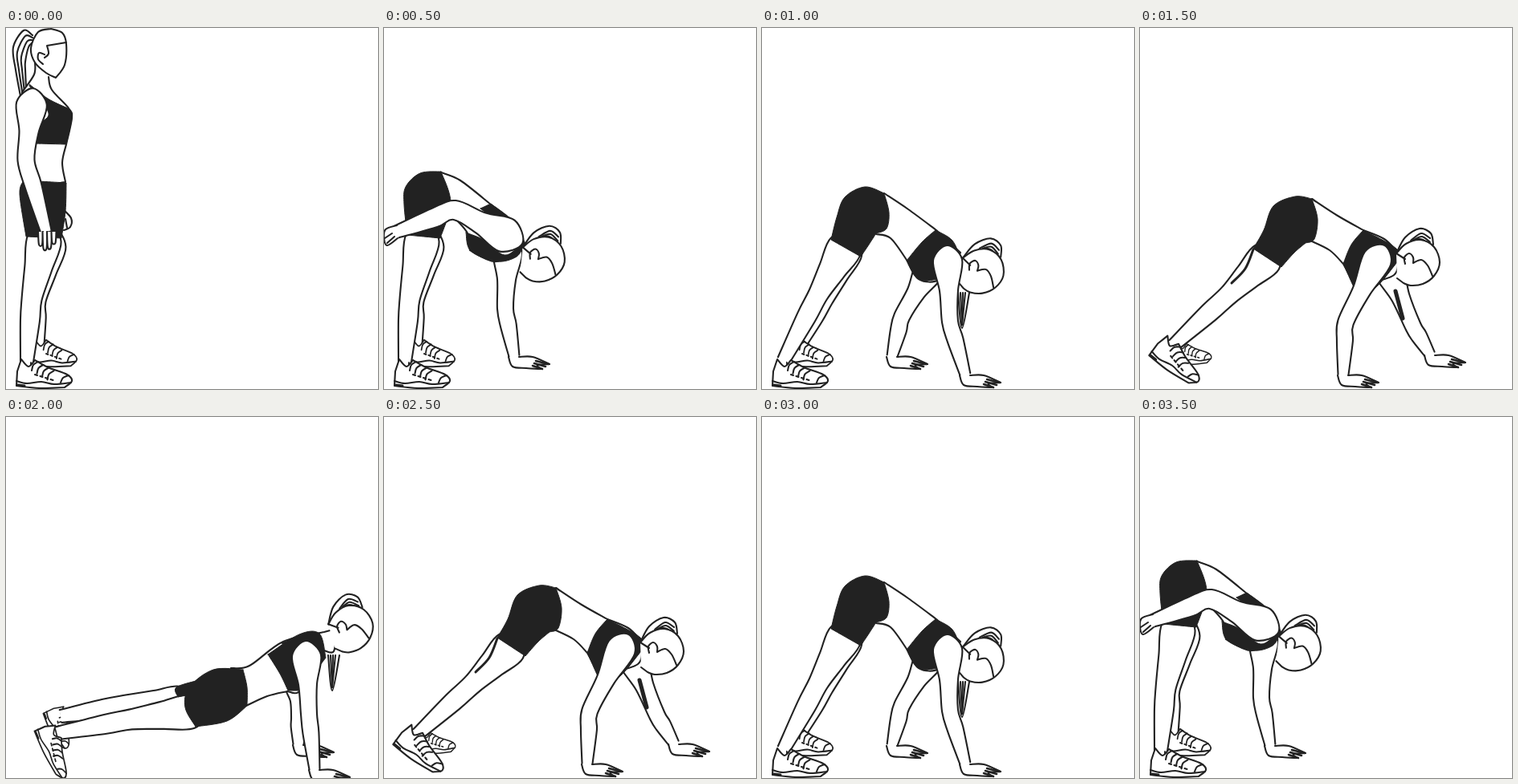
Recreate the animation shown at these times as an HTML page with a canvas. Size 463x450 px, loop 4 s.

```html
<!DOCTYPE html>
<html lang="en">
<head>
<meta charset="utf-8">
<title>Walkout exercise</title>
<style>
  html, body { margin: 0; width: 100%; height: 100%; overflow: hidden; background: #fff; }
  canvas { display: block; }
</style>
</head>
<body>
<canvas id="stage" width="463" height="450"></canvas>
<script>
const ctx = document.getElementById("stage").getContext("2d");
const INK = "#222", PAPER = "#fff", STEP = 500;

// Smooth curve through points, added to a path.
function spline(path, pts) {
  for (let i = 0; i < pts.length - 1; i++) {
    const b = pts[i], c = pts[i + 1], a = pts[i - 1] || b, d = pts[i + 2] || c;
    path.bezierCurveTo(b[0] + (c[0] - a[0]) / 6, b[1] + (c[1] - a[1]) / 6,
      c[0] - (d[0] - b[0]) / 6, c[1] - (d[1] - b[1]) / 6, ...c);
  }
}

// "x,y x,y | x,y": smooth runs, with a corner at the point before each "|".
function trace(text) {
  const path = new Path2D();
  let last;
  for (const run of text.split("|")) {
    const pts = run.trim().split(/\s+/).map(p => p.split(",").map(Number));
    if (last) pts.unshift(last);
    else path.moveTo(...pts[0]);
    spline(path, pts);
    last = pts.at(-1);
  }
  return path;
}

function paint(path, fill, width = 2.1) {
  ctx.fillStyle = fill || "transparent";
  ctx.fill(path);
  ctx.lineWidth = width;
  ctx.stroke(path);
}
const skin = text => paint(trace(text), PAPER);
const cloth = text => paint(trace(text), INK, 1);
const line = (text, width) => paint(trace(text), null, width);

const mix = (a, b, t) => a.map((v, i) => v + (b[i] - v) * t);

function placed(x, y, angle, sx, sy, body) {
  ctx.save();
  ctx.translate(x, y);
  ctx.rotate(angle * Math.PI / 180);
  ctx.scale(sx, sy);
  body();
  ctx.restore();
}

// Tapered limb along joints with the given radii: round at the start, open at the end.
function limb(joints, radii) {
  const left = [], right = [];
  let cap;
  joints.forEach(([x, y], i) => {
    const a = joints[i - 1] || joints[i], b = joints[i + 1] || joints[i], r = radii[i];
    const len = Math.hypot(b[0] - a[0], b[1] - a[1]);
    const dx = (b[0] - a[0]) / len * r, dy = (b[1] - a[1]) / len * r;
    left.unshift([x + dy, y - dx]);
    right.push([x - dy, y + dx]);
    cap ||= [x - dx, y - dy];
  });
  const pts = [...left, cap, ...right], path = new Path2D();
  path.moveTo(...pts[0]);
  spline(path, pts);
  paint(path, PAPER);
}

const leg = (hip, knee, ankle) =>
  limb([hip, mix(hip, knee, .5), knee, mix(knee, ankle, .35), ankle], [21, 17, 12.5, 12, 8]);

const arm = (shoulder, elbow, wrist, size = 1) =>
  limb([shoulder, mix(shoulder, elbow, .5), elbow, mix(elbow, wrist, .35), wrist],
    [18, 11.5, 10, 10, 6.5].map(r => r * size));

function propArm(shoulder, elbow, wrist) {
  arm(shoulder, elbow, wrist);
  placed(wrist[0] - 7, wrist[1] + 1, 0, 1, 1, () => {
    skin("13,0 30,0 51,9 | 36,10 40,15 | 22,14 5,12 0,0");
    for (let i = 0; i < 3; i++) line(`${34 - 2 * i},${5 + 3 * i} ${50 - 4 * i},${9 + 3 * i}`, 2.6);
  });
}

function shoe(x, y, angle = 0, sx = 1, sy = 1) {
  placed(x, y, angle, sx, sy, () => {
    skin("2,16 7,1 | 16,10 24,2 | 40,11 64,20 70,28 61,36 | 30,37 1,34 | 2,16");
    line("1,28 14,31 32,29 48,32 69,30");
    line("56,30 59,24 66,21");
    for (let i = 0; i < 4; i++) {
      const lx = 28 + 6.5 * i, ly = 4 + 3.8 * i;
      line(`${lx},${ly} ${lx - 6},${ly + 4} ${lx - 8},${ly + 11}`);
      line(`${lx - 4},${20 + 2 * i} ${lx - 1},${21 + 2 * i}`);
    }
    line("3,33 11,34", 3);
  });
}

// Head looking down, with the hair tied up in a bun.
function head(x, y, angle) {
  placed(x, y, angle, 1, 1, () => {
    skin("-27,-11 -16,-31 2,-42 16,-36 19,-22");
    for (let i = 0; i < 3; i++) line(`${-9 + 4 * i},${-27 - i} ${4 + i},${-36 + 4 * i} ${15},${-30 + 5 * i}`);
    skin("-27,-11 -15,-23 3,-28 20,-19 27,0 20,17 6,27 -9,29 -18,26 | -26,20");
    line("-27,-11 -16,-4");
    line("-16,2 -17,-6 -11,-11 -6,-6 -6,1 | 4,-3 12,4 18,17");
  });
}

function tail(x, y) {
  skin(`${x - 6},${y} ${x - 1},${y + 44} ${x + 8},${y}`);
  for (let i = -1; i < 2; i++) line(`${x + 3 * i},${y} ${x - 1},${y + 40}`);
}

function standingLegs() {
  leg([54, 268], [37, 340], [39, 402]);
  shoe(30, 387, 0, .83, .95);
  leg([48, 262], [32, 338], [26, 416]);
  shoe(12, 412);
}

function stand() {
  skin("71,226 81,237 80,248 72,252");
  line("74,238 76,249");
  for (let i = 0; i < 4; i++)
    skin(`33,${9 + 3 * i} ${22 + 2 * i},${3 + 7 * i} ${9 + 5 * i},${24 + 6 * i} ${12 + 4 * i},52 ${19 + 2 * i},${90 - 5 * i}`);
  standingLegs();
  skin("36,42 35,58 20,80 | 22,190 74,192 | 70,168 75,145 | 82,112 78,100 57,77 53,61");
  cloth("22,190 17,207 25,260 | 69,262 | 74,228 75,193 | 22,190");
  cloth("29,70 52,88 79,101 | 82,112 75,145 | 37,144 | 39,122 53,106 29,72");
  arm([32, 94], [25, 165], [50, 254], 1.05);
  for (let i = 0; i < 4; i++) {
    const x = 40 + 5.5 * i, tip = 270 + 5 * Math.sin(i * 1.2);
    skin(`${x},254 ${x + 1},${tip} ${x + 5},${tip} ${x + 6},254`);
  }
  skin("56,1 70,6 75,20 73,46 62,62 | 50,56 36,43 31,25 40,5 56,1");
  line("75,18 51,22 | 53,32 48,37");
  line("48,33 41,31 40,39 46,45");
}

function bend() {
  standingLegs();
  propArm([154, 278], [151, 350], [162, 409]);
  skin("71,180 95,190 133,220 | 160,241 175,268 | 140,291 107,277 | 104,256 88,237");
  cloth("71,179 45,181 27,198 25,220 29,258 | 70,262 | 83,218 71,179");
  cloth("120,225 133,219 | 158,240 175,270 | 120,225");
  cloth("102,255 126,265 150,283 174,270 | 165,285 140,291 108,278 102,255");
  head(198, 288, 8);
  arm([153, 259], [88, 227], [16, 254], 1.2);
  skin("16,246 2,251 0,262 4,271 17,262");
  line("1,262 10,256");
  line("4,268 13,260");
}

function pike() {
  leg([105, 275], [76, 338], [42, 402]);
  shoe(30, 387, 0, .83, .95);
  leg([104, 272], [70, 332], [27, 414]);
  shoe(12, 412);
  propArm([209, 300], [174, 360], [162, 409]);
  skin("152,206 182,226 217,252 | 247,280 | 222,313 195,313 180,289 | 160,262 142,257");
  cloth("152,206 128,198 103,211 93,236 86,264 | 123,285 | 133,270 142,256 | 155,250 158,230 152,206");
  cloth("216,252 199,267 180,290 | 195,313 222,313 | 248,290 | 237,265 216,252");
  tail(250, 330);
  head(274, 303, 12);
  propArm([231, 289], [234, 366], [253, 432]);
}

function lean() {
  shoe(42, 393, -4, .65, .75);
  leg([158, 286], [110, 333], [42, 395]);
  line("141,276 131,300 114,318", 3);
  shoe(29, 379, 33);
  propArm([309, 300], [340, 372], [361, 407]);
  line("318,328 327,362", 5);
  skin("214,213 246,234 278,252 | 304,263 320,279 | 316,308 268,321 | 253,294 | 236,277 212,265");
  cloth("214,213 193,210 166,222 154,252 141,275 | 176,298 | 192,280 206,268 | 217,263 221,238 214,213");
  cloth("278,252 263,270 253,294 | 266,323 | 290,326 320,292 | 319,275 278,252");
  head(346, 292, 0);
  propArm([296, 287], [256, 367], [253, 432]);
}

function plank() {
  shoe(70, 356, 62, .75, .8);
  leg([218, 357], [150, 359], [68, 373]);
  leg([232, 367], [155, 377], [64, 394]);
  shoe(59, 378, 62, 1, .8);
  propArm([366, 335], [365, 375], [364, 408]);
  skin("280,313 303,310 345,280 396,268 | 411,264 | 408,292 396,291 | 368,340 350,342 | 325,348 299,360");
  cloth("240,328 212,337 214,349 | 230,346");
  cloth("295,315 258,315 228,337 223,362 236,386 | 275,379 300,360 | 300,337 295,315");
  cloth("326,296 341,320 351,341 | 367,341 | 398,300 | 390,270 365,271 326,296");
  line("344,282 378,271");
  tail(407, 297);
  head(430, 263, -13);
  propArm([374, 297], [377, 370], [384, 439]);
}

const poses = [stand, bend, pike, lean, plank, lean, pike, bend];
ctx.strokeStyle = INK;
ctx.lineCap = ctx.lineJoin = "round";

function frame() {
  ctx.fillStyle = PAPER;
  ctx.fillRect(0, 0, 463, 450);
  poses[Math.floor(performance.now() / STEP) % poses.length]();
  requestAnimationFrame(frame);
}
frame();
</script>
</body>
</html>
```
